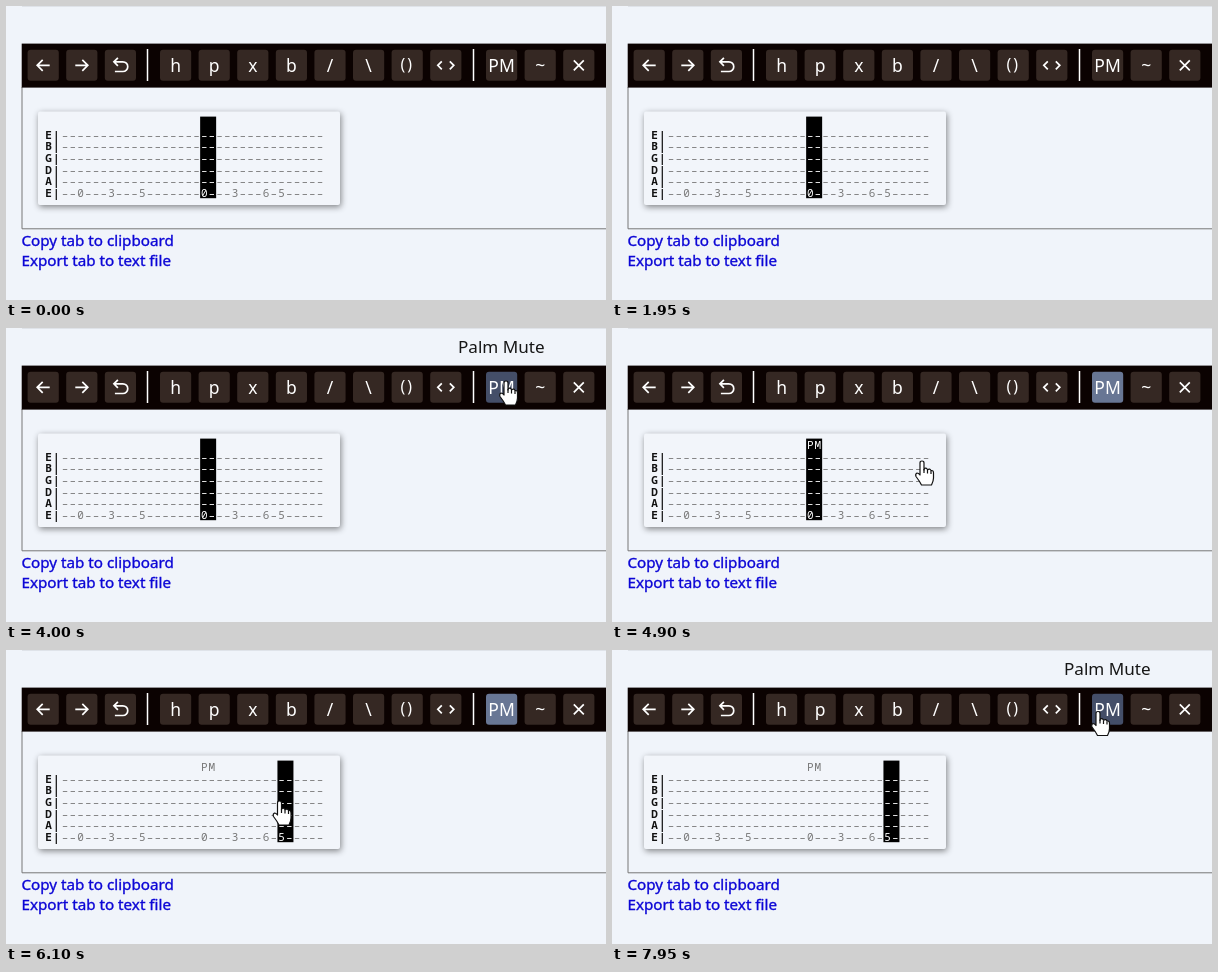
These frames come from a looping animation (600 by 294 pixels, 8000 ms). An HTML page:

```html
<!DOCTYPE html>
<html lang="en">
<head>
<meta charset="utf-8">
<title>Tab editor</title>
<style>
  html, body { margin: 0; width: 100%; height: 100%; overflow: hidden; background: #f0f4fa; }
  svg { display: block; width: 600px; height: 294px; }
  text { font-family: "Noto Sans", "Open Sans", sans-serif; white-space: pre; }
  #bar text { font-size: 17.5px; fill: #fff; text-anchor: middle; }
  #bar path { fill: none; stroke: #fff; stroke-width: 1.7; }
  .link { font-size: 15.2px; fill: #0c06d6; stroke: #0c06d6; stroke-width: .35; }
  .mono { font: 11px "Noto Sans Mono", "DejaVu Sans Mono", monospace; letter-spacing: 1.13px; }
  .card { fill: #f2f5fa; filter: drop-shadow(1px 2px 3px #0007); }
  #cursor path { fill: #fff; stroke: #111; stroke-width: 1.2; stroke-linejoin: round; }
</style>
</head>
<body>
<svg viewBox="0 0 600 294">
  <defs><clipPath id="column"><rect class="mark" y="110.6" width="16" height="81.6"/></clipPath></defs>
  <path d="M16 .5H600" stroke="#dfe3e9"/>
  <text id="tip" x="452" y="25" font-size="17.1" fill="#161616">Palm Mute</text>
  <path d="M16 81V222.8H600" fill="none" stroke="#777"/>
  <rect x="15.7" y="37.6" width="584.3" height="44" fill="#0b0201"/>
  <g id="bar"></g>
  <rect class="card" x="32" y="105.5" width="302" height="93.5" rx="2"/>
  <g id="labels" class="mono" fill="#111"></g>
  <g id="notes" class="mono" fill="#777"></g>
  <rect class="mark" y="110.6" width="16" height="81.6"/>
  <g id="lit" class="mono" fill="#fff" clip-path="url(#column)"></g>
  <text class="link" x="15.5" y="240">Copy tab to clipboard</text>
  <text class="link" x="15.5" y="260">Export tab to text file</text>
  <g id="cursor">
    <path id="arrow" d="M0 0V16L3.8 12.6L6.3 18L8.8 16.9L6.4 11.6H11.4Z"/>
    <g id="hand">
      <path d="M-2 14V2Q-2 0 0 0T2 2V9Q2-.3 2 8Q4 6 5.5 8.7Q8 7 9 9.6Q11.5 9 11.5 12V17Q11.5 20 9.5 24H-.5Q-2.5 20-6 15.5Q-7 13-5 12Q-3.5 12-2 14Z"/>
      <path d="M2 8V12M5.5 9V12.5M9 10V13"/>
    </g>
  </g>
</svg>
<script>
const $ = id => document.getElementById(id);
const pitch = 7.73, firstCol = 55.2;
const rowY = i => 132.6 + i * 11.65;

// Toolbar: text labels or stroked icons drawn around the button centre.
const icons = {
  left: 'M6.5 0H-6M-.5-5.5L-6 0L-.5 5.5',
  right: 'M-6.5 0H6M.5-5.5L6 0L.5 5.5',
  undo: 'M-2.5-7.5L-6.5-3.5L-2.5.5M-6.5-3.5H2.5A4.8 4.8 0 0 1 2.5 6.2H-5.5',
  angle: 'M-4-4L-8 0L-4 4M4-4L8 0L4 4',
  close: 'M-5-5L5 5M5-5L-5 5'
};
const groups = [
  [37.2, ['left', 'right', 'undo']],
  [169.6, ['h', 'p', 'x', 'b', '/', '\\', '()', 'angle']],
  [495.6, ['PM', '~', 'close']]
];
let bar = '<path d="M141.5 43V75M467.5 43V75" style="stroke-width:1.5"/>';
for (const [start, items] of groups) {
  items.forEach((item, i) => {
    const body = icons[item]
      ? `<path d="${icons[item]}"/>`
      : `<text y="${item === '()' ? 5 : 6.5}"${item === '()' ? ' style="font-size:16px;letter-spacing:2px"' : ''}>${item}</text>`;
    bar += `<g transform="translate(${start + i * 38.6} 59.3)">
      <rect${item === 'PM' ? ' id="palm"' : ''}
        x="-15.6" y="-15.6" width="31.2" height="31" rx="3" fill="#352823"/>${body}</g>`;
  });
}
$('bar').innerHTML = bar;

// Tablature, once in grey and once in white for the selected column.
const blank = '-'.repeat(34);
const lines = [...Array(5).fill(blank), '--0---3---5-------0---3---6-5-----'];
const line = (x, y, s, extra = '') => `<text class="mono" x="${x}" y="${y}"${extra}>${s}</text>`;
const tab = lines.map((s, i) => line(firstCol + .55, rowY(i), s.replaceAll('-', '–'))).join('') +
  line(firstCol + 18 * pitch + .55, rowY(-1) + .4, 'PM', ' data-pm');
$('notes').innerHTML = $('lit').innerHTML = tab;
$('labels').innerHTML = [...'EBGDAE'].map((s, i) =>
  line(39.3, rowY(i), s + '|', ' style="font-weight:700"')).join('');

const marks = document.querySelectorAll('.mark');
const palmMarks = document.querySelectorAll('[data-pm]');

const clamp = v => Math.max(0, Math.min(1, v));
const ramp = (t, a, b) => { const u = clamp((t - a) / (b - a)); return u * u * (3 - 2 * u); };
const mix = (a, b, k) => a.map((v, i) => v + (b[i] - v) * k);

// Cursor stops: time, x, y
const route = [
  [2620, 575, -24], [3000, 500, 53], [4630, 500, 53], [4900, 310, 133],
  [5100, 276, 158], [5575, 276, 158], [5600, 273.5, 151], [6480, 273.5, 151],
  [6850, 478, 69], [6960, 486, 61.5]
];
function place(t) {
  const n = route.findIndex(p => p[0] > t);
  if (n < 0) return route.at(-1).slice(1);
  if (!n) return route[0].slice(1);
  const [a, b] = [route[n - 1], route[n]];
  return mix(a, b, ramp(t, a[0], b[0])).slice(1);
}
function overButton(x, y) {
  return y > 44 && y < 75 && groups.some(([start, items]) =>
    items.some((_, i) => Math.abs(x - start - i * 38.6) < 15.6));
}

const normal = [53, 40, 35], hover = [68, 78, 104], active = [104, 118, 148];

function draw(t) {
  const [x, y] = place(t);
  const onCard = x > 32 && x < 334 && y > 105 && y < 199;
  const pointing = onCard || overButton(x, y);
  $('cursor').setAttribute('transform', `translate(${x} ${y})`);
  $('hand').style.display = pointing ? '' : 'none';
  $('arrow').style.display = pointing ? 'none' : '';

  const over = ramp(t, 2920, 3200) * (1 - ramp(t, 4680, 4880)) + ramp(t, 6890, 7150);
  const base = t < 4050 ? normal : active;
  $('palm').setAttribute('fill', `rgb(${mix(base, hover, over).map(Math.round)})`);
  $('tip').style.opacity = over;

  const col = t < 5950 ? 18 : 28;
  marks.forEach(m => m.setAttribute('x', firstCol + col * pitch - .2));
  palmMarks.forEach(p => p.style.display = t < 4050 ? 'none' : '');
}

const begin = performance.now();
function frame() {
  draw((performance.now() - begin) % 8000);
  requestAnimationFrame(frame);
}
frame();
</script>
</body>
</html>
```
